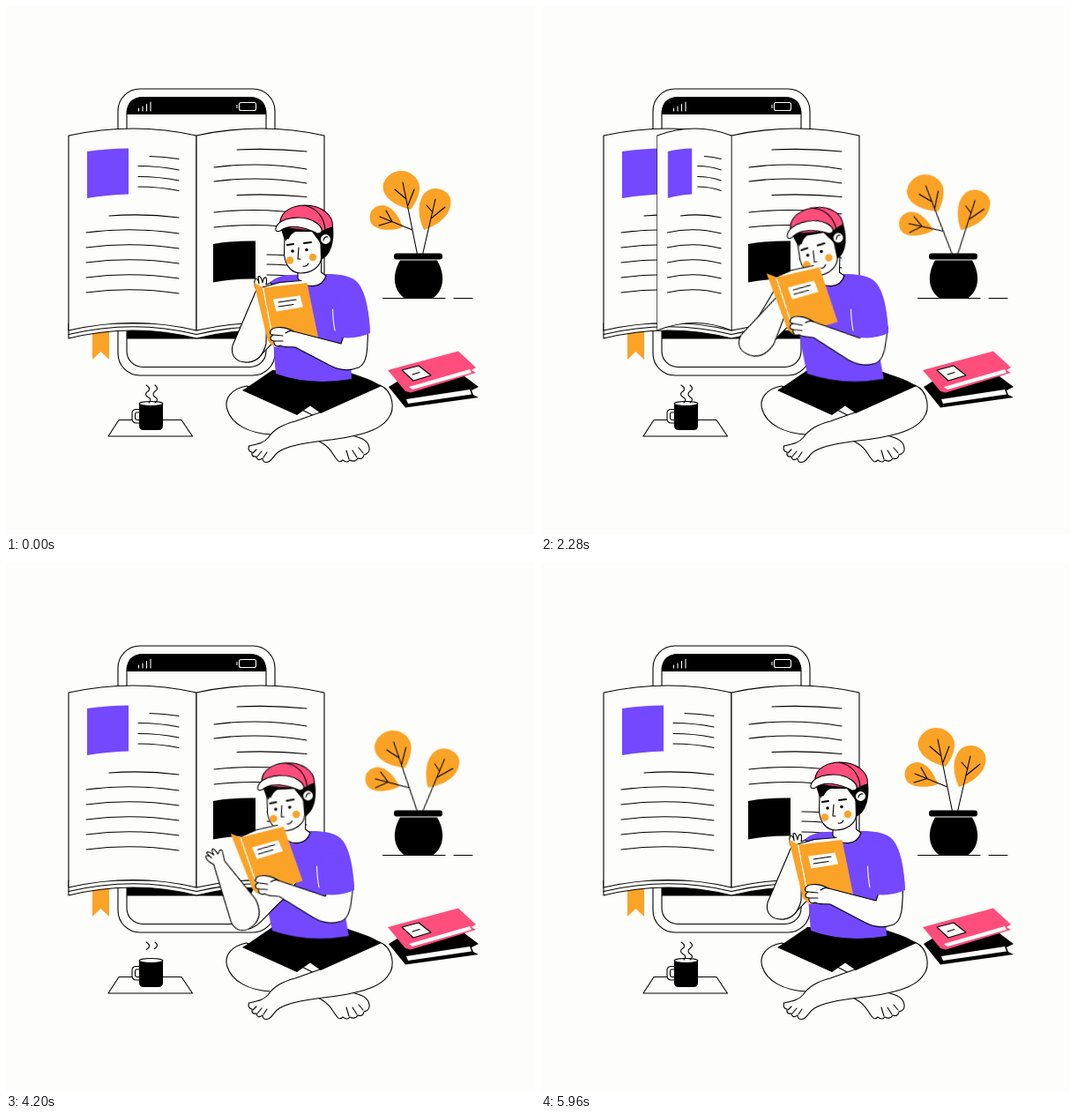
Animation of 600x600 px, one loop 6 s. Source, as an HTML page without scripts:

```html
<!DOCTYPE html>
<html lang="en">
<head>
<meta charset="utf-8">
<title>Reading</title>
<style>
:root { --paper: #fdfdfb; --violet: #7348ff; --amber: #fba326; --red: #ff4d7c; }
html, body { margin: 0; width: 100%; height: 100%; overflow: hidden; background: var(--paper); }
svg { display: block; width: 100vw; height: 100vh; }
path, rect, circle, ellipse { fill: none; stroke: #000; stroke-width: 1.1; stroke-linecap: round; stroke-linejoin: round; }
.w { fill: var(--paper); }
.k, .v, .a, .r, .p { stroke: none; }
.k { fill: #000; }
.v { fill: var(--violet); }
.a { fill: var(--amber); }
.r { fill: var(--red); }
.p { fill: var(--paper); }
.lite { stroke: var(--paper); }

.pose { animation: 6s cubic-bezier(.4,.15,.6,.85) infinite; }
.torso { animation-name: torso; }
.hem { animation-name: hem; transform-origin: 0 425px; }
.head { animation-name: nod; transform-origin: 350px 300px; }
.book { animation-name: book; transform-origin: 317px 347px; }
.arm { animation-name: arm; transform-origin: 395px 400px; }
.elbow { animation-name: elbow; }
.fore { animation-name: fore; }

@keyframes torso {
  0%, 99.3%, 100% { transform: translateX(0); }
  22% { transform: translateX(-5px); }
  38% { transform: translateX(-19px); }
  57.3% { transform: translateX(-14px); }
  70% { transform: translateX(-18px); }
  79.3% { transform: translateX(-4px); }
}
@keyframes hem {
  0%, 99.3%, 100% { transform: translateX(0) skewX(0); }
  22% { transform: translateX(-1px) skewX(2deg); }
  38% { transform: translateX(-3px) skewX(7.5deg); }
  57.3% { transform: translateX(-2px) skewX(5.5deg); }
  70% { transform: translateX(-3px) skewX(7deg); }
  79.3% { transform: translateX(-1px) skewX(1.6deg); }
}
@keyframes nod {
  0%, 79.3%, 100% { transform: rotate(0); }
  22% { transform: rotate(-2.5deg); }
  38% { transform: rotate(-10deg); }
  57.3% { transform: rotate(-11deg); }
  70% { transform: rotate(-3deg); }
}
@keyframes book {
  0%, 99.3%, 100% { transform: translate(0, 0) rotate(0); }
  22% { transform: translate(-5.5px, -5px) rotate(-3deg); }
  38% { transform: translate(-21.5px, -15px) rotate(-7deg); }
  57.3% { transform: translate(-15.5px, -18px) rotate(-5deg); }
  70% { transform: translate(-22px, -12px) rotate(-8deg); }
  79.3% { transform: translate(-5.5px, -4px) rotate(-3deg); }
}
@keyframes arm {
  0%, 99.3%, 100% { transform: translate(0, 0) rotate(0); }
  22% { transform: translate(-5px, -1px) rotate(1deg); }
  38% { transform: translate(-20px, -5px) rotate(5deg); }
  57.3% { transform: translate(-14px, -6px) rotate(8deg); }
  70% { transform: translate(-19px, -4px) rotate(4deg); }
  79.3% { transform: translate(-4px, -2px) rotate(1deg); }
}
@keyframes elbow {
  0%, 99.3%, 100% { transform: translate(272px, 393px); }
  22% { transform: translate(264px, 392px); }
  38% { transform: translate(239px, 385px); }
  57.3% { transform: translate(252px, 387px); }
  70% { transform: translate(272px, 404px); }
  79.3% { transform: translate(271px, 395px); }
}
@keyframes fore {
  0%, 22%, 99.3%, 100% { transform: rotate(0); }
  38% { transform: rotate(20deg); }
  57.3% { transform: rotate(3deg); }
  70% { transform: rotate(-40deg); }
  79.3% { transform: rotate(-7deg); }
}

.leaves { animation: sway 3s ease-in-out infinite alternate; transform-origin: 467px 282px; --to: -11deg; }
.leaf { animation: sway 1.5s ease-in-out infinite alternate; transform-origin: 472px 282px; --to: 10.5deg; }
@keyframes sway { to { transform: rotate(var(--to)); } }

.turn { transform-origin: 216px 0; animation: 6s infinite; }
.front { animation-name: lift; }
.back { animation-name: lay; }
@keyframes lift {
  0%, 30.1% { transform: scaleX(1); visibility: hidden; }
  30.2% { transform: scaleX(1); visibility: visible; animation-timing-function: cubic-bezier(.47,0,.745,.715); }
  35.8% { transform: scaleX(0); visibility: visible; }
  35.9%, 100% { transform: scaleX(0); visibility: hidden; }
}
@keyframes lay {
  0%, 35.7% { transform: scaleX(0); visibility: hidden; }
  35.8% { transform: scaleX(0); visibility: visible; animation-timing-function: cubic-bezier(.39,.575,.565,1); }
  41.6% { transform: scaleX(1); visibility: visible; }
  41.7%, 100% { transform: scaleX(1); visibility: hidden; }
}

.steam { stroke-dasharray: 1 1; animation: 6s linear infinite; }
.s1 { animation-name: steam1; }
.s2 { animation-name: steam2; }
@keyframes steam1 {
  0%, 15% { stroke-dashoffset: 0; }
  24.5% { stroke-dashoffset: -1; }
  34%, 64% { stroke-dashoffset: -2; }
  74.5% { stroke-dashoffset: -3; }
  80.5%, 100% { stroke-dashoffset: -4; }
}
@keyframes steam2 {
  0%, 22% { stroke-dashoffset: 0; }
  29% { stroke-dashoffset: -1; }
  36.5%, 63% { stroke-dashoffset: -2; }
  74.5% { stroke-dashoffset: -3; }
  79%, 100% { stroke-dashoffset: -4; }
}
</style>
</head>
<body>
<svg viewBox="0 0 600 600">
  <defs>
    <g id="left">
      <path class="w" d="M216 147Q145 131 71 147V368Q145 351 216 368Z"/>
      <path class="v" d="M92 165Q115 161.500 139 161.500V213.500Q115 214 92 218Z"/>
      <path d="M163 170.500q17 .5 33 3M150 181.500q24 0 46 4.500M150 193.500q24 0 46 4.500M150 205q24 0 46 4.500"/>
      <path d="M117 238q40-3 79 2M91 257q52-7 105 1m-105 16q52-7 105 1m-105 16q52-7 105 1m-105 16q52-7 105 1m-105 16q52-7 105 1"/>
    </g>
    <g id="right">
      <path class="w" d="M216 147Q290 131 361 147V368Q290 351 216 368Z"/>
      <path class="k" d="M235 270Q259 266 283 266.500V309.500Q259 309 235 313.500Z"/>
      <path d="M262 163q40-2 79 2M236 183q52-7 105 2m-105 14q52-7 105 2M262 214.500q40-2 79 2M236 234q52-6 105 2m-105 15q52-6 105 2M296 282q23 0 45 4m-45 7q23 0 45 4m-45 8q23 0 45 4"/>
    </g>
  </defs>

  <!-- phone -->
  <rect class="w" x="127" y="94" width="178" height="325" rx="25"/>
  <rect class="w" x="137" y="103.500" width="158" height="306" rx="18"/>
  <path class="k" d="M137 123V121Q137 103.500 155 103.500H277Q295 103.500 295 121V123ZM137 350H295V377.500H137Z"/>
  <path class="lite" d="M150.500 119v-3M155 119v-5M159.500 119v-7.500M164 119v-10"/>
  <rect class="lite" x="264.500" y="109.500" width="19" height="9" rx="2"/>
  <path class="lite" d="M262 112.500v3"/>

  <!-- large book -->
  <path class="a" d="M98 362H117V401L107.500 392 98 401Z"/>
  <path class="w" d="M71 360V377Q145 359 216 377Q290 359 361 377V360Z"/>
  <path d="M71 372.500Q145 355 216 372.500Q290 355 361 372.500"/>
  <use href="#left"/>
  <use href="#right"/>
  <g class="turn front"><use href="#right"/></g>
  <g class="turn back"><use href="#left"/></g>

  <!-- cup -->
  <path class="w" d="M128 469.500H199L211.500 488H116Z"/>
  <path class="w" d="M152 457.500H147Q143 458 143 462V468Q143 473 148 473H152M152 461H148Q146.500 461 146.500 464V467Q146.500 469.500 149 469.500H152"/>
  <path class="k" d="M151 451H178V476Q178 481 173 481H156Q151 481 151 476Z"/>
  <ellipse class="w" cx="164.500" cy="451" rx="13.500" ry="2.500"/>
  <path class="steam s1" pathLength="1" d="M162 450Q166 446 161 443.500Q156 440 161 437Q165 434 159 430"/>
  <path class="steam s2" pathLength="1" d="M169 450Q174 446 169 443.500Q165 440 169 437Q174 434 169 430"/>

  <!-- plant -->
  <g class="leaves">
    <path class="a" d="M459 231C440 226 427.500 217 427.500 204A21 20 0 0 1 469 204C470 214 464 224 459 231Z"/>
    <path class="a" d="M450 251C440 255 420 256 414 246C409 234 418 225.500 428 226C440 228 446 240 450 251Z"/>
    <path d="M450 200L467 284M441 208L454 219M463 208L456 226M424 239L461 254M431 232L438 244.500M423 249L438 244.500"/>
  </g>
  <g class="leaf">
    <path class="a" d="M474 254C467 240 466 222 475 212C484 203 500 207 504 218C507 234 494 247 474 254Z"/>
    <path d="M487 219L472 284M477 226L484 234M498 228L482 241"/>
  </g>
  <rect class="k" x="440" y="280.500" width="55" height="7" rx="3"/>
  <path class="k" d="M447 288.500H489C496 300 500 320 484 331.500H452C436 320 440 300 447 288.500Z"/>
  <path d="M427.500 331.500H498M508 331.500H529"/>

  <!-- stacked books -->
  <path class="k" d="M434 432L447 424 520 420 536 432 528 436 530 441 536 444 453 455.500Z"/>
  <path class="p" d="M454 446L526 435 528 440.500 456 451Z"/>
  <path class="r" d="M433 413L513 391.500 533 410 528 413 533 416 459 438.500 453 437Z"/>
  <path class="p" d="M457 432L526 412 528 416 461 435Z"/>
  <path class="w" d="M449 413L468 408 482 419 462 425ZM461 418L469 415.500"/>

  <!-- legs -->
  <path class="w" d="M273 431C255 434 247 446 251 458C256 474 275 485 302 486L345 488 359 496C369 502 370 508 375 514Q378 519 382 515Q387 519 390 515Q396 518 399 513Q405 515 406 509Q413 507 412 501C411 493 404 490 392 487L330 455Z"/>
  <path class="w" d="M424 430C440 437 441 458 434 467C424 483 395 489 360 493C335 496 318 500 310 505C303 509 302 517 296 517.500Q291 518 291 513Q285 517 284 511Q278 512 279 506Q274 505 275.500 499C284 497 292 496 297 490C304 480 313 475 328 471L356 461Z"/>
  <path class="k" d="M302 413C292 420 279 429 268 436L330 464 345 453.500 357 462 426 431C412 422 398 419 388 415Z"/>
  <path d="M400 501l5 6M393 504l5 8M386 504l3 10M284 503l-4 4M290 505l-5 6M296 506l-4 6"/>

  <!-- reader -->
  <path class="v pose hem" d="M303 358Q303 390 306 417Q345 431 392 423L391 400 395 358Z"/>
  <g class="pose torso">
    <path class="v" d="M322 305C308 306 298 311 294 322L316 372H395L413 371C412 348 408 320 396 311C388 305 375 304 364 304Z"/>
    <path class="w" d="M331 286V309C340 321 358 321 363 306L357.500 302 358 280Z"/>
    <g class="pose head">
      <path class="k" d="M311 250L316 266H322L340 252 354 262 357 288C368 284 373 268 371 250L350 238Z"/>
      <path class="w" d="M316 262L315.500 282C317 296 325 303 334 303C346 303 357 296 357.500 286L357 270 353 256 334 252Q324 255 320 264Z"/>
      <path class="k" d="M313 250L317 267Q321 260 328 256L347 256 356 268 358 252Z"/>
      <circle class="w" cx="362.500" cy="264.500" r="6"/>
      <path d="M360 266Q361 261 365 262"/>
      <path class="r" d="M310 250C309 233 325 226 339 226C358 226 371 237 370.500 250Q364 252 357 256Z"/>
      <path d="M311 245C312 232 326 226 339 226C358 226 371 237 370.500 250M338 226C353 229 361 240 362 254"/>
      <path class="w" d="M306 252C309 239 338 236 352 246C359 251 361 258 353 258C338 250 321 247 311 255Q305 257 306 252Z"/>
      <path style="stroke-width:2" d="M319 271l7-1M338 269l8-1"/>
      <circle class="k" cx="325" cy="278" r="1.800"/>
      <circle class="k" cx="341" cy="276.500" r="1.800"/>
      <circle class="a" cx="322" cy="288.500" r="4.200"/>
      <circle class="a" cx="348" cy="285" r="4.200"/>
      <path d="M332 274L331 287H334M337 295Q341 296 343 292"/>
    </g>
    <path class="lite" d="M370.500 344Q371 358 373 368"/>
  </g>

  <g class="pose elbow">
    <path class="w" d="M3 11C14 10 24-6 42-22L60-45 30-70 0-20"/>
    <g class="pose fore">
      <path class="w" d="M-15-8L12-71Q8-79 11-84Q14-84 15-78L14-86Q17-88 19-79Q20-86 23-85Q24-81 23-77L28-79Q31-78 27-72L24-66 23-10C20 2 14 10 3 11C-8 12-18 6-15-8Z"/>
    </g>
  </g>

  <g class="pose book">
    <path class="p" d="M289 320L310 314 335 311 342 316Z"/>
    <path d="M291 319L310 313.500 335 311.500"/>
    <path class="a" d="M281 313.500L291 319 304 387 297 380ZM292 319.500L341.500 314 354.500 378 305 387Z"/>
    <path class="lite" d="M291.500 320L304.500 386"/>
    <path class="p" d="M303 332.500L333.500 328.500 337 341.500 306.500 346.500Z"/>
    <path d="M309 336L329 333M309 341L326 338.500"/>
  </g>

  <g class="pose arm">
    <path class="w" d="M326 369C318 364 306 363 301 367C298 371 300 373 303 373C298 376 300 380 304 380C303 385 308 387 311 385C316 388 322 386 328 387L368 408C378 413 390 414 400 410C410 405 410 390 410.500 368H385L380 383Z"/>
    <path d="M303 373L314 374M304 380L314 380M326 369Q322 367 317 371"/>
  </g>
  <path class="v pose torso" d="M374 330L380 376Q398 378 413 371Q412 350 406 328Z"/>
</svg>
</body>
</html>
```
